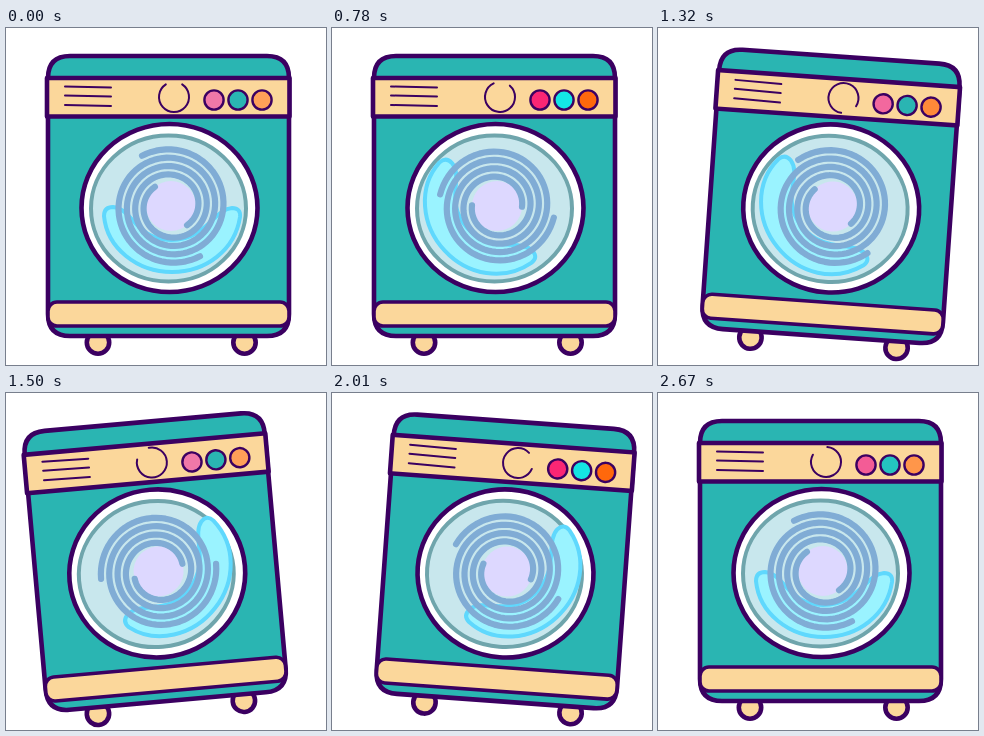
Recreate the animation shown at these times as an HTML page. Size 320 px wide and 337 px high, loop 2700 ms.

```html
<!DOCTYPE html>
<html lang="en">
<head>
<meta charset="utf-8">
<title>Washing machine</title>
<style>
  html, body { margin: 0; width: 100%; height: 100%; overflow: hidden; background: #fff; }
  svg { display: block; width: 100%; height: 100%; }
  .line { stroke: #3b0061; stroke-width: 4.6; stroke-linejoin: round; }
  .thin { fill: none; stroke: #3b0061; stroke-width: 2; stroke-linecap: round; }
  .teal { fill: #2ab5b2; }
  .cream { fill: #fbd79b; }
</style>
</head>
<body>
<svg viewBox="0 0 320 337">
  <g id="machine">
    <g class="line cream">
      <circle cx="92" cy="314.5" r="11.2"/>
      <circle cx="238.5" cy="314.5" r="11.2"/>
    </g>
    <path class="line teal" d="M42 50Q42 28 64 28H261Q283 28 283 50V286Q283 308 261 308H64Q42 308 42 286Z"/>
    <rect class="line cream" x="41" y="50" width="242.5" height="38.5"/>
    <rect class="line cream" x="42" y="274" width="241" height="24" rx="9" style="stroke-width:3.6"/>
    <path class="thin" d="M59 58.5L105 59.5M59 67.5L105 68.5M59 77L105 78"/>
    <path class="thin" id="dial"/>
    <g id="buttons" class="line" style="stroke-width:2.4">
      <circle cx="208" cy="72" r="9.6"/>
      <circle cx="232" cy="72" r="9.6"/>
      <circle cx="256" cy="72" r="9.6"/>
    </g>
    <ellipse class="line" cx="163.5" cy="180" rx="88" ry="84" fill="#fff"/>
    <ellipse cx="162.5" cy="180.5" rx="77.5" ry="73" fill="#c8e7ed" stroke="#6fa5ac" stroke-width="4"/>
    <path id="water" fill="#9af3ff" stroke="#5fd8fd" stroke-width="4" stroke-linejoin="round"
      d="M98 188Q98 179 107 179C126 180 130 212 165 212S208 181 226 180Q235 180 234 189C229 222 200 244 166 244C131 244 101 220 98 188Z"/>
    <circle cx="165" cy="178" r="25" fill="#ddd8ff"/>
    <path id="swirl" fill="none" stroke="#80acd5" stroke-width="6.2" stroke-linecap="round" stroke-linejoin="round"/>
  </g>
</svg>
<script>
const LOOP = 2700, STEP = 30;
const { PI, sin, cos, min, max } = Math;
const $ = id => document.getElementById(id);
const rad = deg => deg * PI / 180;

function spiralArm(start) {
  const sweep = 710;
  let d = '';
  for (let a = 0; a <= sweep; a += 5) {
    const r = 58 - 33 * a / sweep, angle = rad(start + a);
    d += `${a ? 'L' : 'M'}${(165 + r * cos(angle)).toFixed(2)} ${(178 + r * sin(angle)).toFixed(2)}`;
  }
  return d;
}
$('swirl').setAttribute('d', spiralArm(240) + spiralArm(60));

const dialPoint = deg => `${168 + 15 * cos(rad(deg))} ${69 + 15 * sin(rad(deg))}`;
$('dial').setAttribute('d', `M${dialPoint(-57)}A15 15 0 1 1 ${dialPoint(237)}`);

// Seven half swings in the second part of the loop
function tilt(t) {
  const swings = (t - 1120) / 156;
  return swings > 0 && swings < 7 ? -5.2 * sin(PI * swings) : 0;
}

// Water sloshes with a short hold at each side and settles at both ends of the loop
function slosh(t) {
  const swing = max(-1, min(1, 1.2 * cos(2 * PI * (t - 1530) / 500)));
  return -47 * swing * max(0, min(1, t / 250, (2670 - t) / 250));
}

// Six turns, faster near the start and end
const spin = t => 2160 * t / 2670 + 42 * sin(2 * PI * t / 2670);

const pulse = (t, from, to) => t > from && t < to ? sin(PI * (t - from) / (to - from)) ** 2 : 0;
const lights = [
  { off: [240, 120, 168], on: [250, 38, 116], glow: t => 1.4 * (pulse(t, 0, 1500) + pulse(t, 1500, 2900)) },
  { off: [42, 181, 178], on: [18, 232, 232], glow: t => 1.1 * (pulse(t, 300, 1080) + pulse(t, 1500, 2900)) },
  { off: [255, 160, 88], on: [255, 104, 12], glow: t => 3 * (pulse(t, 0, 1500) + pulse(t, 1500, 2770)) }
];

const rotate = (id, deg, x, y) => $(id).setAttribute('transform', `rotate(${deg} ${x} ${y})`);

function draw(t) {
  rotate('machine', tilt(t), 162.5, 318);
  rotate('water', slosh(t), 164, 172);
  rotate('swirl', spin(t), 165, 178);
  rotate('dial', 28 * t / STEP, 168, 69);
  lights.forEach(({ off, on, glow }, i) => {
    const k = min(1, glow(t));
    $('buttons').children[i].setAttribute('fill', `rgb(${off.map((c, j) => Math.round(c + (on[j] - c) * k))})`);
  });
}

const start = performance.now();
function frame() {
  const t = (performance.now() - start) % LOOP;
  draw(Math.floor(t / STEP) * STEP);
  requestAnimationFrame(frame);
}
frame();
</script>
</body>
</html>
```
